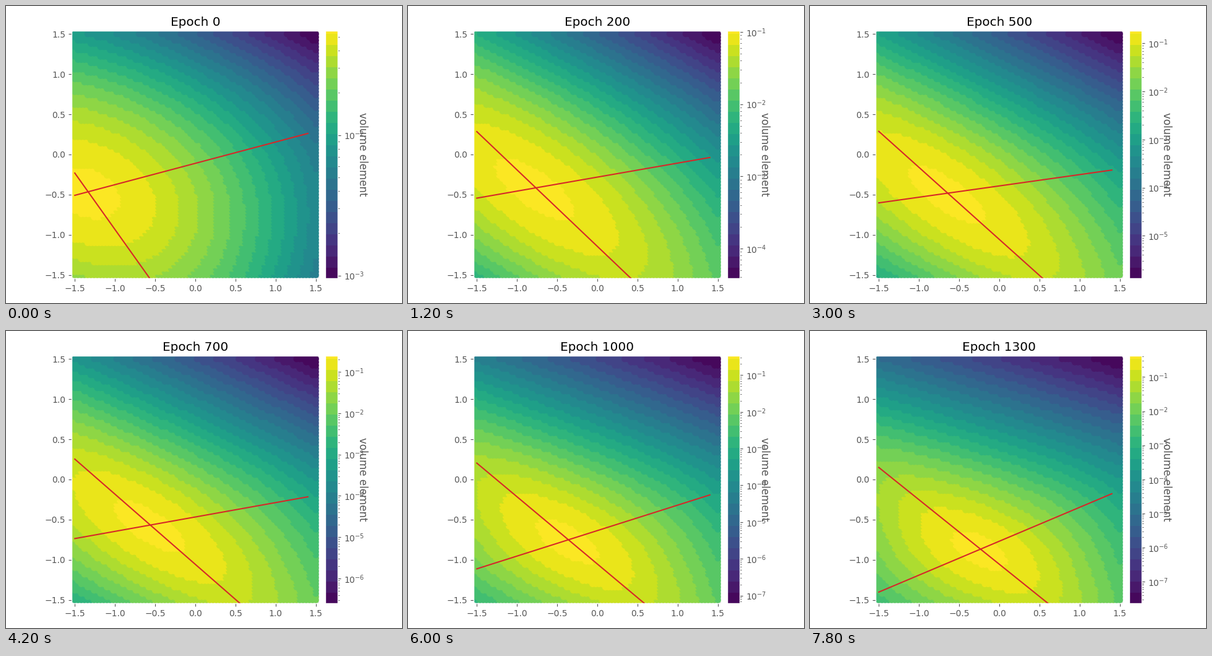
Write a matplotlib script that moves like this. It is 640x480 px and loops after 8 s.

```python
import numpy as np
import matplotlib as mpl
import matplotlib.pyplot as plt
from matplotlib.animation import FuncAnimation
from matplotlib.colors import ListedColormap, LogNorm

W, H, DPI = 640, 480, 100
FRAME_MS, LOOP_MS = 100, 8000
FRAMES_PER_STEP, EPOCHS_PER_STEP = 3, 50
GREY = "#555555"

plt.rcParams.update({
    "font.family": "DejaVu Sans", "font.size": 10,
    "axes.facecolor": "#E5E5E5", "axes.edgecolor": "white",
    "axes.linewidth": 1, "axes.labelcolor": GREY,
    "axes.titlesize": 14.4, "axes.labelsize": 12,
    "xtick.color": GREY, "ytick.color": GREY,
})

# Two sigmoid units: the zero line and the weight norm of each while training.
EPOCHS = np.array([0, 100, 300, 700, 900, 1100, 1300], float)
LEFT_1 = [-.508, -.547, -.539, -.735, -.982, -1.230, -1.401]   # y at x = -1.5
RIGHT_1 = [.262, .1155, -.1386, -.2156, -.200, -.185, -.177]   # y at x = 1.4
LEFT_2 = [-.231, .223, .308, .254, .223, .185, .150]
SLOPE_2 = [-1.405, -1.0006, -.9273, -.8734, -.850, -.8246, -.8032]
NORM_1 = [1.337, 1.379, 1.626, 2.313, 2.501, 2.825, 3.020]
NORM_2 = [1.412, 2.190, 3.263, 4.345, 4.705, 4.900, 5.090]


def smooth(values, epoch):
    """Monotone cubic interpolation over EPOCHS."""
    y = np.array(values)
    step = np.diff(EPOCHS)
    secant = np.diff(y) / step
    before, after = secant[:-1], secant[1:]
    tangent = np.empty_like(y)
    same_sign = before * after > 0
    total = np.where(same_sign, before + after, 1)
    tangent[1:-1] = np.where(same_sign, 2 * before * after / total, 0)
    tangent[0] = (3 * secant[0] - tangent[1]) / 2
    tangent[-1] = (3 * secant[-1] - tangent[-2]) / 2
    k = min(np.searchsorted(EPOCHS, epoch, side="right") - 1, len(step) - 1)
    h = step[k]
    t = (epoch - EPOCHS[k]) / h
    return ((2*t**3 - 3*t**2 + 1) * y[k] + (t**3 - 2*t**2 + t) * h * tangent[k]
            + (3*t**2 - 2*t**3) * y[k + 1] + (t**3 - t**2) * h * tangent[k + 1])


def banded_viridis(band=.045, top=.012):
    """Viridis in flat bands, counted down from a thin top band."""
    t = np.linspace(0, 1, 512)
    index = np.ceil((1 - t - top) / band)
    centre = 1 - top - (index - .5) * band
    return ListedColormap(mpl.colormaps["viridis"](np.clip(centre, 0, .993)))


def unit(left, slope, norm):
    """Weights of a unit and its pre-activation on the grid."""
    weights = norm * np.array([-slope, 1]) / np.hypot(slope, 1)
    z = weights[0] * (grid_x + 1.5) + weights[1] * (grid_y - left)
    return weights, z


def sigmoid_slope(z):
    return .25 / np.cosh(z / 2) ** 2


def pixel_axes(x, y, w, h):
    return fig.add_axes([x / W, y / H, w / W, h / H])


fig = plt.figure(figsize=(W / DPI, H / DPI), dpi=DPI, facecolor="white")
ax = pixel_axes(106, 40, 400, 400)
bar_ax = pixel_axes(516, 40, 20, 400)

side = np.linspace(-1.5, 1.5, 76)
grid_x, grid_y = (g.ravel() for g in np.meshgrid(side, side))
dots = ax.scatter(grid_x, grid_y, c=np.ones(grid_x.size), s=56, linewidths=0,
                  cmap=banded_viridis(), norm=LogNorm(1e-3, 5e-2))
line_x = np.array([-1.5, 1.4])
line_1, line_2 = (ax.plot(line_x, line_x, color="tab:red", lw=1.5)[0]
                  for _ in range(2))
ax.set(xlim=(-1.54, 1.54), ylim=(-1.54, 1.54))
ticks = np.arange(-1.5, 1.6, .5)
ax.set_xticks(ticks)
ax.set_yticks(ticks)
title = ax.set_title("Epoch 0")
bar = fig.colorbar(dots, cax=bar_ax)
bar.set_label("volume element", rotation=270)


def update(frame):
    epoch = frame // FRAMES_PER_STEP * EPOCHS_PER_STEP
    left_1, right_1, left_2, slope_2, norm_1, norm_2 = (
        smooth(v, epoch)
        for v in (LEFT_1, RIGHT_1, LEFT_2, SLOPE_2, NORM_1, NORM_2))
    slope_1 = (right_1 - left_1) / np.ptp(line_x)
    w1, z1 = unit(left_1, slope_1, norm_1)
    w2, z2 = unit(left_2, slope_2, norm_2)
    det = abs(w1[0] * w2[1] - w1[1] * w2[0])
    volume = det / 2 * sigmoid_slope(z1) * sigmoid_slope(z2)

    dots.set_array(volume)
    dots.set_clim(volume.min(), volume.max())
    line_1.set_ydata(left_1 + slope_1 * (line_x + 1.5))
    line_2.set_ydata(left_2 + slope_2 * (line_x + 1.5))
    title.set_text(f"Epoch {epoch}")
    return dots, line_1, line_2, title


anim = FuncAnimation(fig, update, frames=LOOP_MS // FRAME_MS,
                     interval=FRAME_MS, repeat=True, repeat_delay=0)
plt.show()
```
